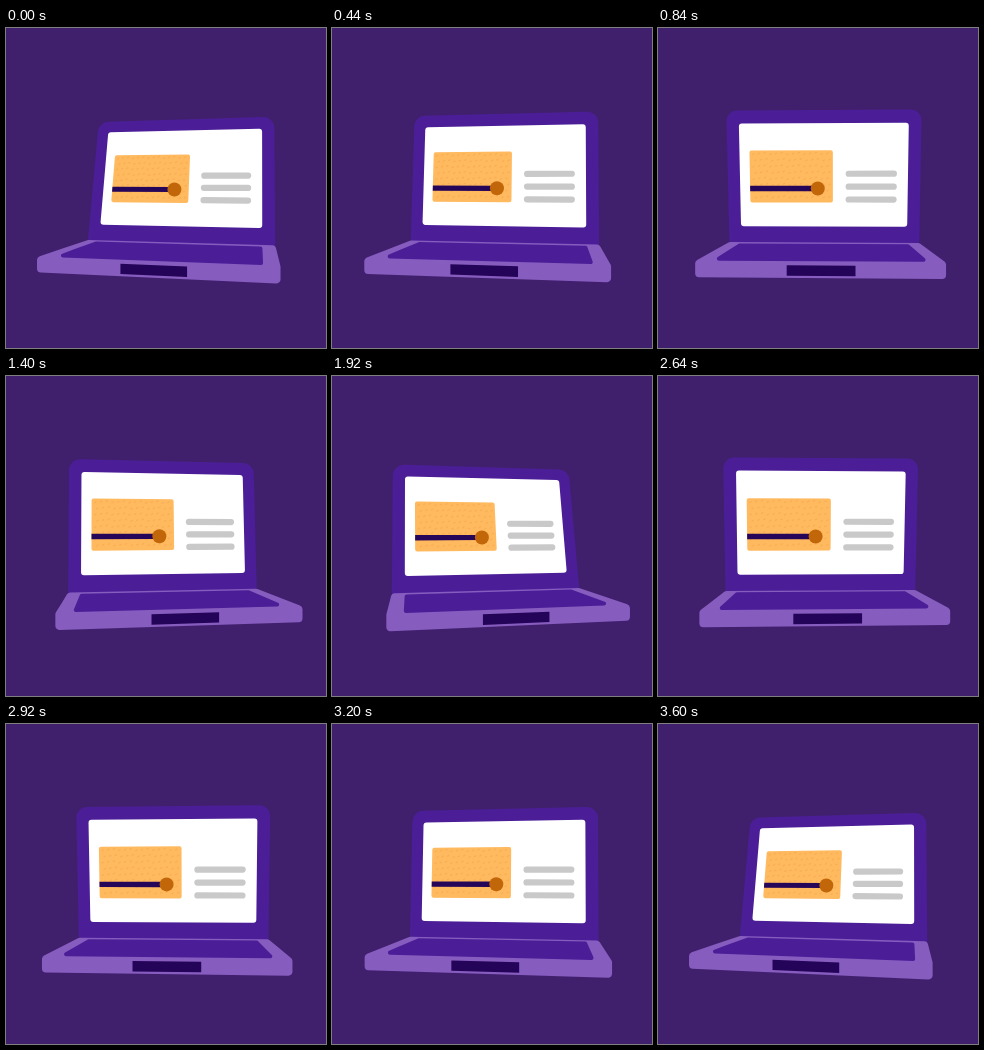
An HTML page with a canvas that plays this animation: 320x320 px, repeating every 3640 ms.

```html
<!DOCTYPE html>
<html>
<head>
<meta charset="utf-8">
<title>Laptop</title>
<style>
html, body { margin: 0; height: 100%; overflow: hidden; background: #40206d; }
canvas { display: block; }
</style>
</head>
<body>
<canvas width="320" height="320"></canvas>
<script>
const ctx = document.querySelector('canvas').getContext('2d');
const LOOP = 3640, LAG = 25;
const CENTER = 164.5, HORIZON = 154, DISTANCE = 433;
const SWING = .203;

// Laptop size, measured from the turning axis at eye level
const HALF = 103.2, BACK = 37.6, FRONT = -77.1, FLOOR = 65.7, BOTTOM = 79, LID = 142.4;

let angle, lean;

// Turn a point about the vertical axis and project it
function project(x, y, z) {
  const sin = Math.sin(angle), cos = Math.cos(angle);
  const scale = DISTANCE / (DISTANCE + z * cos + x * sin);
  return [CENTER + (x * cos - z * sin) * scale, HORIZON + y * scale];
}

const onLid = (x, h) => project(x, FLOOR - h * Math.cos(lean), BACK + h * Math.sin(lean));
const onDeck = (x, z) => project(x, FLOOR, z);
const onFront = (x, y) => project(x, y, FRONT);
const onScreen = (u, v) => onLid(180 * u - 90, 128.7 - 111 * v);

const rect = (plane, x0, y0, x1, y1) =>
  [plane(x0, y0), plane(x1, y0), plane(x1, y1), plane(x0, y1)];

function poly(points, color, radius = 0) {
  const a = points[points.length - 1], b = points[0];
  ctx.fillStyle = color;
  ctx.beginPath();
  ctx.moveTo((a[0] + b[0]) / 2, (a[1] + b[1]) / 2);
  points.forEach((p, i) => ctx.arcTo(...p, ...points[(i + 1) % points.length], radius));
  ctx.closePath();
  ctx.fill();
}

function disc([x, y], r, color) {
  ctx.fillStyle = color;
  ctx.beginPath();
  ctx.arc(x, y, r, 0, 2 * Math.PI);
  ctx.fill();
}

function stroke(from, to, width, color) {
  ctx.strokeStyle = color;
  ctx.lineWidth = width;
  ctx.lineCap = 'round';
  ctx.beginPath();
  ctx.moveTo(...from);
  ctx.lineTo(...to);
  ctx.stroke();
}

function drawCard() {
  poly(rect(onScreen, .06, .26, .556, .765), '#ffb95f', 2);
  for (let row = 0; row < 8; row++)
    for (let col = 0; col < 14; col++) {
      const u = .078 + col * .034 + (row % 2) * .012;
      const v = .3 + row * .06 - (col % 3) * .007;
      stroke(onScreen(u, v), onScreen(u + .008, v - .008), 1.2, '#f8ae54');
    }
  poly(rect(onScreen, .06, .602, .45, .655), '#260659');
  disc(onScreen(.466, .628), 7, '#c2660a');
}

function draw(time) {
  const turn = -Math.cos(2 * Math.PI * (time - LAG) / LOOP);
  angle = SWING * turn;
  lean = -.104 + .344 * turn * turn;

  ctx.fillStyle = '#40206d';
  ctx.fillRect(0, 0, 320, 320);

  poly(rect(onLid, -HALF, LID, HALF, -10), '#4b1e98', 11);
  poly(rect(onScreen, 0, 0, 1, 1), '#fff', 3);
  drawCard();
  for (const v of [.485, .61, .735])
    stroke(onScreen(.65, v), onScreen(.917, v), 6.2, '#c9c9c9');

  poly([
    onDeck(-HALF, BACK), onDeck(HALF, BACK), onDeck(HALF, FRONT),
    onFront(HALF, BOTTOM), onFront(-HALF, BOTTOM), onDeck(-HALF, FRONT)
  ], '#875cbf', 4);
  poly(rect(onDeck, -90, 27, 90, -74), '#4b1e98', 2);
  poly(rect(onFront, -27, 68.6, 29.6, 77.2), '#240458');
}

function tick() {
  draw(performance.now() % LOOP);
  requestAnimationFrame(tick);
}
tick();
</script>
</body>
</html>
```
